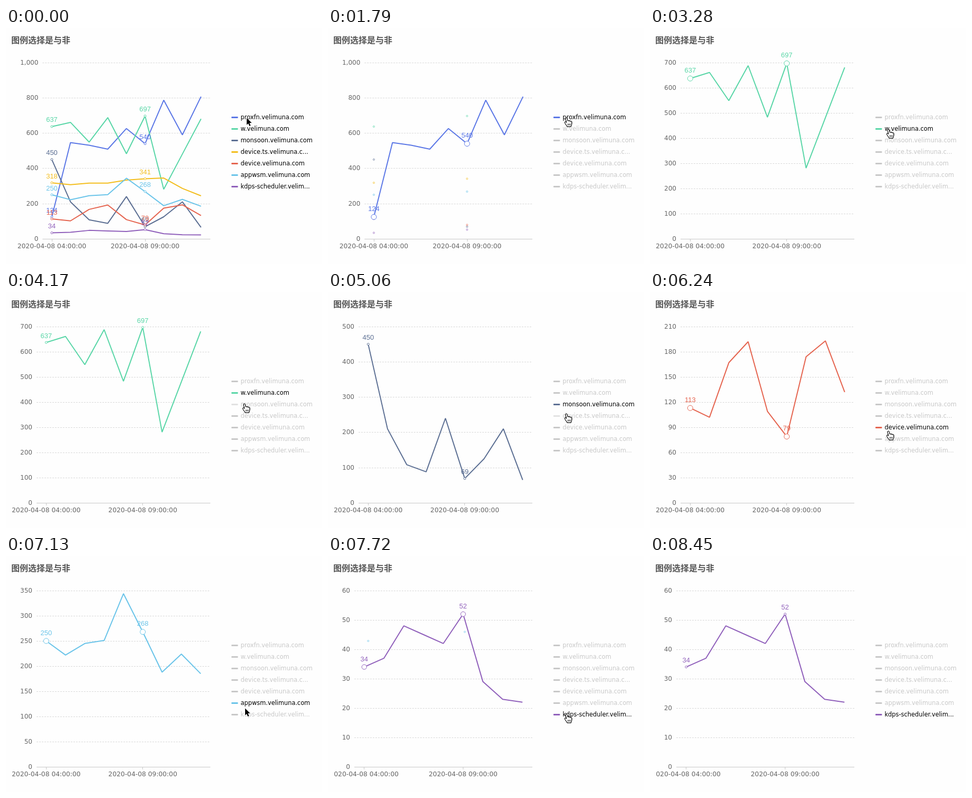
An HTML page with a canvas that plays this animation: 600x450 px, repeating every 8580 ms.

```html
<!DOCTYPE html>
<html lang="zh">
<head>
<meta charset="utf-8">
<title>图例选择是与非</title>
<style>
html, body { margin: 0; width: 100%; height: 100%; overflow: hidden; background: #fefefe; }
canvas { display: block; width: 600px; height: 450px; }
</style>
</head>
<body>
<canvas id="stage" width="600" height="450"></canvas>
<script>
const ctx = document.getElementById('stage').getContext('2d');
const LOOP = 8580, END = 8500, FIRST_HOVER = 400, FADE = 150;
const TOP = 66, BASE = 402, RIGHT = 388;
const ROW_Y = 170, ROW_H = 22;
const UI = '"DejaVu Sans", sans-serif';
const GREY = '#c8c8c8';

// click: when the legend item is picked; aim: where the pointer rests on it
const series = [
  { name: 'proxfn.velimuna.com', color: '#5b77e6', click: 1750, aim: 171,
    data: [124, 546, 531, 509, 626, 540, 787, 590, 807] },
  { name: 'w.velimuna.com', color: '#59d6a7', click: 3080, aim: 193,
    data: [637, 661, 549, 688, 483, 697, 281, 481, 681] },
  { name: 'monsoon.velimuna.com', color: '#5c6f93', click: 4270, aim: 213,
    data: [450, 210, 108, 88, 240, 69, 125, 210, 65] },
  { name: 'device.ts.velimuna.c...', color: '#f3bd1c', click: 5150, aim: 232,
    data: [318, 307, 316, 316, 333, 341, 345, 286, 244] },
  { name: 'device.velimuna.com', color: '#e5644f', click: 6040, aim: 265,
    data: [113, 102, 167, 192, 109, 79, 174, 193, 132] },
  { name: 'appwsm.velimuna.com', color: '#6ac4e9', click: 6920, aim: 290,
    data: [250, 222, 245, 251, 344, 268, 188, 224, 185] },
  { name: 'kdps-scheduler.velim...', color: '#9060bb', click: 7670, aim: 301,
    data: [34, 37, 48, 45, 42, 52, 29, 23, 22] }
];
// Between two clicks the pointer dwells, then travels to its next stop.
series.forEach((s, i) => {
  const next = series[i + 1] || { click: END, aim: 500 };
  const span = next.click - s.click;
  s.on = i ? s.click - 50 : FIRST_HOVER;
  s.off = s.click + .45 * span;
  s.travel = .36 * span;
  s.move = next.aim - s.aim;
  s.box = layout(s.data);
});
const marks = { 0: '2020-04-08 04:00:00', 5: '2020-04-08 09:00:00' };

const arrow = new Path2D('M0 .6V13.8L3 11L5.2 16L7.5 15L5.3 10.1H9.6Z');
const hand = new Path2D('M-1.6 .3C-3 .7 -3 2 -2.6 3.3L-1 9.4C-2 8.3 -3.6 7.5 -4.5 8.5' +
  'C-5.2 9.6 -3.2 11.2 -2.2 13.2C-1.5 14.4 -.3 15 0 17H7.4C7.4 15 8.8 13.8 8.8 11' +
  'V8C8.6 6.6 6.9 6.4 6.4 7.4C6.1 5.7 4.1 5.5 3.7 6.7C3.3 5.4 1.7 5.2 1.2 6.2' +
  'L.2 1.6C-.1 .5 -.8 .1 -1.6 .3Z');

function clamp(v) { return Math.max(0, Math.min(1, v)); }
function ease(v) { return 1 - (1 - clamp(v)) ** 3; }

// The picture advances in steps of slightly under 150 ms.
function stepped(t) {
  const k = Math.floor((150 - Math.sqrt(22500 - .124 * (t + 18))) / .062);
  return 150 * k - .031 * k * k;
}

// Round axis interval that splits the range in about five.
function niceStep(range) {
  const raw = range / 5;
  const unit = 10 ** Math.floor(Math.log10(raw));
  const f = raw / unit;
  return unit * (f < 1.5 ? 1 : f < 2.5 ? 2 : f < 4 ? 3 : f < 7 ? 5 : 10);
}

function layout(data) {
  const peak = Math.max(...data);
  const step = niceStep(peak);
  const max = Math.ceil(peak / step) * step;
  const left = max >= 1000 ? 69.3 : max >= 100 ? 58 : 50;
  const band = (RIGHT - left) / data.length;
  return {
    left, max, step,
    x: i => left + band * (i + .5),
    y: v => BASE - (BASE - TOP) * v / max
  };
}

function text(str, x, y, font, color, align = 'left') {
  ctx.font = font;
  ctx.fillStyle = color;
  ctx.textAlign = align;
  ctx.fillText(str, x, y);
}

function segment(x1, y1, x2, y2, color) {
  ctx.strokeStyle = color;
  ctx.lineWidth = 1;
  ctx.beginPath();
  ctx.moveTo(x1, y1);
  ctx.lineTo(x2, y2);
  ctx.stroke();
}

function drawAxes(box) {
  for (let v = 0; v <= box.max; v += box.step) {
    const y = Math.floor(Math.round(box.y(v) * 2) / 2);
    if (v) {
      ctx.setLineDash([3, 2]);
      segment(box.left, y + .5, RIGHT, y + .5, '#d8d8d8');
      ctx.setLineDash([]);
    }
    text(v.toLocaleString('en-US'), box.left - 8, y + 4, '12px ' + UI, '#666', 'right');
  }
  segment(box.left, BASE + .5, RIGHT, BASE + .5, '#c6c6c6');
  for (const m in marks) {
    const x = box.x(+m), tick = Math.floor(x) + .5;
    segment(tick, BASE, tick, BASE + 5, '#c6c6c6');
    text(marks[m], x, BASE + 17.5, '12.3px ' + UI, '#666', 'center');
  }
}

function drawLine(s, box) {
  ctx.beginPath();
  s.data.forEach((v, i) => ctx.lineTo(box.x(i), box.y(v)));
  ctx.strokeStyle = s.color;
  ctx.lineWidth = 2;
  ctx.lineJoin = 'bevel';
  ctx.stroke();
}

function drawRings(s, box, r, labelled) {
  for (const m in marks) {
    const x = box.x(+m), y = box.y(s.data[m]);
    ctx.beginPath();
    ctx.arc(x, y, r, 0, Math.PI * 2);
    ctx.fillStyle = '#fff';
    ctx.fill();
    ctx.strokeStyle = s.color;
    ctx.lineWidth = 1;
    ctx.stroke();
    if (labelled)
      text(s.data[m], x, y - r - 6.5, '13px "Liberation Sans", Arial, sans-serif', s.color, 'center');
  }
}

function drawChart(t, picked) {
  const box = series[Math.max(0, picked)].box;
  const shown = picked < 0 ? series : [series[picked]];
  drawAxes(box);
  shown.forEach(s => drawLine(s, box));

  // Rings of the series just switched off fade away.
  if (picked >= 0 && t - series[picked].click < FADE) {
    const gone = picked ? [series[picked - 1]] : series.slice(1);
    ctx.globalAlpha = .75;
    gone.forEach(s => drawRings(s, series[Math.max(0, picked - 1)].box, 1.5, false));
    ctx.globalAlpha = 1;
  }
  for (const s of shown) {
    const grow = ease((t - s.on) / 200) - ease((t - s.off) / 200);
    drawRings(s, box, 2 + 3 * grow, true);
  }
}

function drawLegend(picked, hovered) {
  series.forEach((s, i) => {
    const y = ROW_Y + ROW_H * i;
    const active = picked < 0 || picked === i;
    ctx.fillStyle = active ? s.color : hovered === i ? '#e2e2e2' : GREY;
    ctx.beginPath();
    ctx.roundRect(428, y - 1, 12.5, 3, 1);
    ctx.fill();
    text(s.name, 445.5, y + 4, '11.4px ' + UI, active ? '#000' : GREY);
  });
}

function pointerAt(t) {
  const wander = Math.sin(Math.PI * clamp((t - 150) / 750));
  const y = series.reduce((sum, s) => sum + s.move * clamp((t - s.off) / s.travel), series[0].aim);
  return { x: (t < FIRST_HOVER ? 457 : 454) + 12 * wander, y: y + 4 * wander };
}

function drawPointer(p, isHand) {
  const shape = isHand ? hand : arrow;
  ctx.save();
  ctx.translate(p.x, p.y);
  ctx.lineJoin = 'round';
  ctx.strokeStyle = isHand ? '#000' : '#fff';
  ctx.fillStyle = isHand ? '#fff' : '#000';
  ctx.lineWidth = isHand ? 1.2 : 2;
  ctx.stroke(shape);
  ctx.fill(shape);
  if (isHand) {
    ctx.lineWidth = 1;
    ctx.stroke(shape);
    for (const x of [1.6, 3.8, 6]) segment(x, 11.5, x, 14.5, '#000');
  }
  ctx.restore();
}

function draw(t) {
  const picked = series.filter(s => t >= s.click).length - 1;
  ctx.fillStyle = '#fefefe';
  ctx.fillRect(0, 0, 600, 450);
  text('图例选择是与非', 10, 29, 'bold 16px "Noto Sans CJK SC", "Noto Sans CJK", sans-serif', '#555');

  ctx.save();
  ctx.beginPath();
  ctx.rect(10.7, 0, 590, 450);
  ctx.clip();
  drawChart(t, picked);
  ctx.restore();

  const p = pointerAt(t);
  const row = Math.round((p.y - ROW_Y) / ROW_H);
  const over = t > FIRST_HOVER && Math.abs(p.y - ROW_Y - ROW_H * row) < 8.5;
  drawLegend(picked, over ? row : -1);
  drawPointer(p, over && row < series.length);
}

const start = performance.now();
function frame() {
  draw(stepped((performance.now() - start) % LOOP));
  requestAnimationFrame(frame);
}
frame();
</script>
</body>
</html>
```
